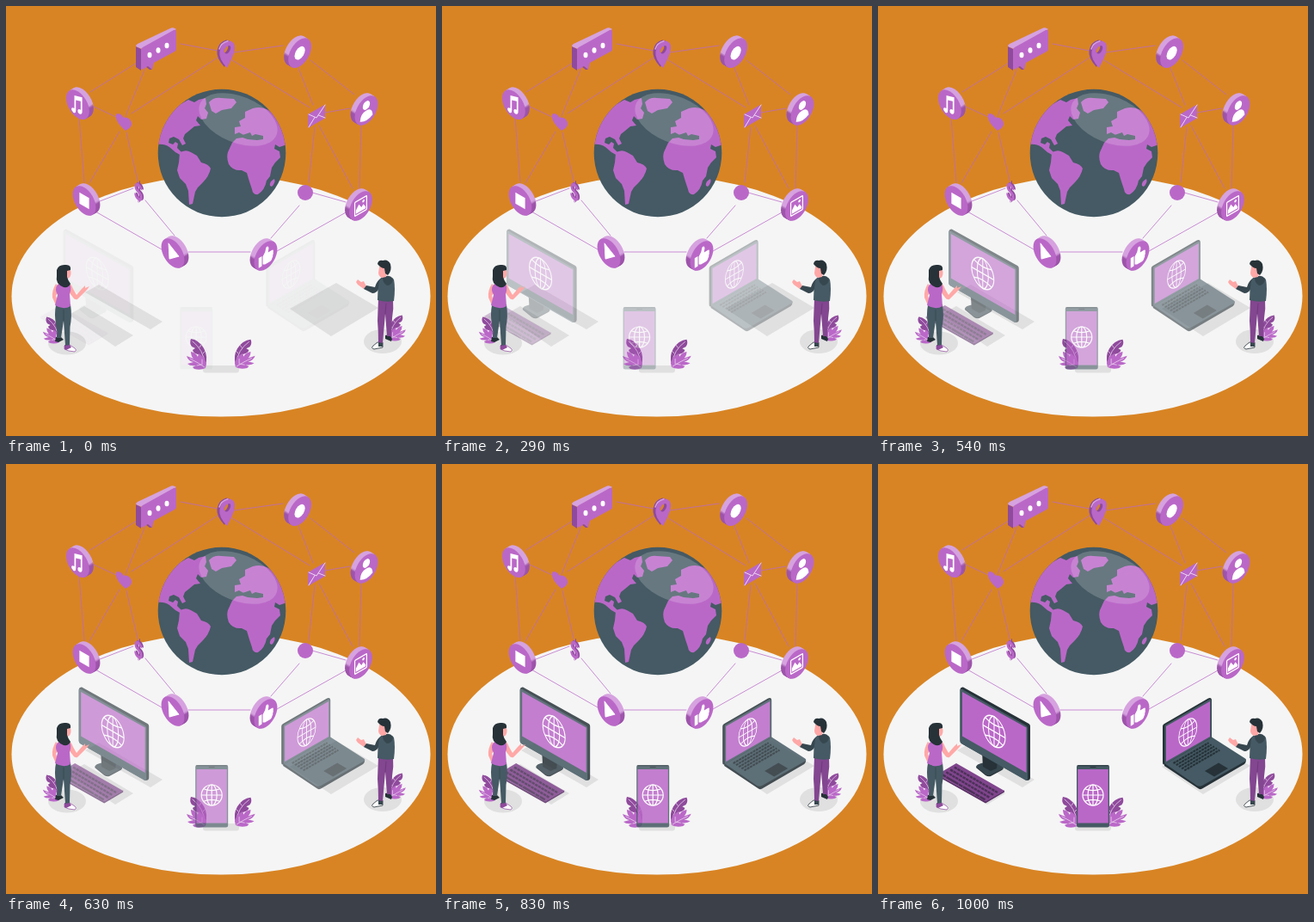
An HTML page for the animation above (1.04 s loop, 500x500 px).

```html
<!DOCTYPE html>
<html lang="en">
<head>
<meta charset="utf-8">
<title>Connected world</title>
<style>
  html, body { margin: 0; width: 100%; height: 100%; overflow: hidden; background: #d88424; }
  svg { display: block; width: 100vw; height: 100vh; }
</style>
</head>
<body>
<svg id="stage" viewBox="0 0 500 500" xmlns="http://www.w3.org/2000/svg"></svg>
<script>
const LOOP = 1040, STEP = 1000 / 24, STEPS = 25, TRAVEL = 30;
const PURPLE = '#ba68c8', DEEP = '#8f4a9c', LIGHT = '#d6a2df', PALE = '#ead3ee';
const SLATE = '#455a64', DARK = '#263238', STEEL = '#37474f';
const SKIN = '#ffa8a7', SHADE = '#e0e0e0';

const path = (d, fill, extra = '') => `<path d="${d}" fill="${fill}" ${extra}/>`;
const poly = (pts, fill, extra = '') => `<polygon points="${pts}" fill="${fill}" ${extra}/>`;
const line = (d, stroke, w, extra = '') =>
  `<path d="${d}" fill="none" stroke="${stroke}" stroke-width="${w}" stroke-linecap="round" stroke-linejoin="round" ${extra}/>`;
const oval = (x, y, rx, ry, fill, extra = '') =>
  `<ellipse cx="${x}" cy="${y}" rx="${rx}" ry="${ry}" fill="${fill}" ${extra}/>`;
const group = (transform, body) => `<g transform="${transform}">${body}</g>`;

const defs = `<defs>
  <linearGradient id="rim" x1="0" y1="0" x2="0" y2="1">
    <stop offset=".34" stop-color="${LIGHT}"/><stop offset=".42" stop-color="#9d54aa"/>
  </linearGradient>
  <clipPath id="world"><circle cx="251" cy="171" r="74.3"/></clipPath>
</defs>`;

// Globe with continents
function earth() {
  const land = [
    // North America
    'M176 161L180 143L196 118L212 109L219 112L224 109L232 107L233 114L231 119L235 124L233 131L227 132L223 128L221 133L226 139L219 140L213 145L208 149L206 154L209 160L205 162L201 155L195 152L190 154L189 159L194 161L197 158L200 160L199 165L203 169L207 171L204 174L197 170L190 164Q184 160 176 161Z',
    // South America
    'M202 171Q208 166 215 170L222 174L227 182Q236 184 238 189Q236 198 229 205L223 211L220 216L217 230L213 231L212 215L209 207L202 200L199 191L201 182Z',
    // Greenland
    'M236 112Q241 106 250 107L265 108L268 112L262 119L251 121L244 125L239 122Z',
    // Europe, Asia and Africa
    'M266 149L266 141L273 140L271 134L278 130L278 123L287 119Q297 116 305 121L318 132L330 160L318 164L313 161L312 166L318 169L319 176L313 182L309 188L307 198L303 203Q301 214 293 219Q287 220 286 213L283 204L280 194L274 191Q264 192 259 184Q256 176 258 170L263 159L268 154L275 153L278 151L271 147Z',
    'M307 209Q306 204 312 201Q314 205 309 210Z'
  ];
  const sea = 'M275 150L284 147L286 151L290 149L299 151L299 155L292 156L281 155L275 153Z';
  return oval(251, 171, 74.3, 74.3, SLATE) + `<g clip-path="url(#world)">` +
    land.map(d => path(d, PURPLE)).join('') + path(sea, SLATE) +
    oval(270, 132, 48, 27, '#fff', 'opacity=".18" transform="rotate(22 270 132)"') + '</g>';
}

// Each link: x1 y1 x2 y2
const links = `98 100 152 66,162 72 139 128,203 44 246 52,246 60 146 125,265 54 322 46,263 63 353 118,
340 72 357 115,354 63 405 103,371 124 400 119,102 117 128 129,85 130 91 205,132 146 97 206,140 147 153 203,
109 227 148 212,104 239 181 283,162 226 196 267,212 286 284 286,308 270 341 232,315 285 397 239,
356 217 395 228,352 205 359 141,364 139 403 212,413 138 411 212`;
const network = () => line(links.split(',').map(s => {
  const [a, b, c, d] = s.trim().split(' ');
  return `M${a} ${b}L${c} ${d}`;
}).join(''), PURPLE, .75);

// Isometric coin; side 1 has its rim on the right, -1 on the left
function coin(x, y, side, icon) {
  const iso = (dx, dy, body) => group(`matrix(.866 ${.5 * side} 0 1 ${x + dx} ${y + dy})`, body);
  let out = '';
  for (let i = 5; i > 0; i--) out += iso(i * side, -.6 * i, '<circle r="15.5" fill="url(#rim)"/>');
  return out + iso(0, 0, `<circle r="15.5" fill="${PURPLE}"/>` + icon);
}

const icons = {
  music: path('M-4.5 -8.5L6 -11.5L6 5Q6 9 2.5 9.5Q-.5 9.5 0 6.5Q1 4 4 4L4 -6L-2.5 -4L-2.5 8Q-2.5 12 -6 12Q-9 11.5 -8.4 8.6Q-7.4 6.2 -4.5 6.6Z', '#fff'),
  person: '<circle cy="-6" r="4.8" fill="#fff"/>' + path('M-8.5 9Q-8 0 0 0T8.5 9Q0 14 -8.5 9Z', '#fff'),
  play: path('M-5.8 -8.6L8 -.5L-4.6 8.8Z', '#fff', 'stroke="#fff" stroke-linejoin="round"'),
  thumb: path('M-9.5 -2H-5.2V9.5H-9.5ZM-4 -1Q0 -4 .5 -9.5Q3.5 -11 4 -7L3.2 -2.5H8.5Q11 -2 10 1Q10.8 2.5 9.5 4Q10 6 8.5 7Q8.5 9.5 6 9.5H-1L-4 8Z', '#fff'),
  photo: '<rect x="-8" y="-8" width="16" height="16" rx="1" fill="none" stroke="#fff" stroke-width="1.4"/>' +
    path('M-6.5 6V2L-2.5 -3L1 2L3.5 -.5L6.5 4V6Z', '#fff') + '<circle cx="3.6" cy="-4" r="1.5" fill="#fff"/>',
  disc: '<circle r="7" fill="#fff"/>',
  square: '<rect x="-6.5" y="-6.5" width="13" height="13" fill="#fff"/>'
};

function chat() {
  return poly('151,47 157,50 157,75 151,71', DEEP) +
    path('M151 47Q151 45 153 44L192 25.5Q195 24.5 198 27L158 50Z', LIGHT) +
    path('M157 51Q157 49 159 48L195 28Q198 27 198 30V50Q198 52 196 53L172 66L170 74L165 70L159 73.5Q157 74.5 157 72Z', PURPLE) +
    path('M165 70L170 74L167 74L163 71Z', DEEP) +
    [[167, 57], [177, 51.5], [187, 46]].map(([x, y]) => oval(x, y, 2.5, 3.3, '#fff')).join('');
}

function pin() {
  const body = 'M257 72Q247 61 248.5 53Q250 43 259 40.5Q267 41 266 50Q265 58 257 72ZM258 46.5Q253.5 49 254 54Q256 57 259 54Q262 50 261 47Q260 45.5 258 46.5Z';
  return path(body, DEEP, 'fill-rule="evenodd" transform="translate(-3 -1)"') +
    path(body, PURPLE, 'fill-rule="evenodd"') +
    line('M248 50Q250 43 258 40.8', LIGHT, 1.5);
}

function dollar() {
  const sign = (x, y, fill) => group(`matrix(.72 .4 0 1.15 ${x} ${y})`,
    `<text text-anchor="middle" font-family="Inter, sans-serif" font-weight="700" font-size="23" fill="${fill}">$</text>`);
  return sign(155.3, 225, DEEP) + sign(154, 225.7, PURPLE);
}

function smallIcons() {
  const heart = 'M139 145C133 140 127 133 128 127C129 123 135 126 137 130C141 128 147 133 146 138C145 142 142 143 139 145Z';
  return path(heart, PURPLE) +
    poly('351,126 371,114.5 371,130.5 351,142', PURPLE) +
    line('M352 126L361 130L371 115M352 141L359 129.5M371 130L363.5 127', '#f3e3f5', .9) +
    oval(348, 217, 9, 9, PURPLE);
}

// Wire globe, drawn round 0,0
const wire = (transform, r) => group(transform,
  `<g fill="none" stroke="#fff" stroke-width="1.2"><circle r="${r}"/><ellipse rx="${r * .5}" ry="${r}"/>` +
  `<path d="M0 ${-r}V${r}M${-r} 0H${r}M${-r * .8} ${-r * .6}Q0 ${-r * .3} ${r * .8} ${-r * .6}` +
  `M${-r * .8} ${r * .6}Q0 ${r * .3} ${r * .8} ${r * .6}"/></g>`);

function keyboard() {
  let keys = '';
  for (let i = 0; i < 4; i++) {
    const x = 74.5 + i * 4.8, y = 361 - i * 2.8;
    keys += line(`M${x} ${y}l50 29.4`, '#4b3158', 2.4, `stroke-dasharray="${i ? '3.4 .8' : '5 .8 16 .8'}" style="stroke-linecap:butt"`);
  }
  return poly('69,361 125,392 147,379.5 147,381.5 125,394.5 69,363', '#5a3066') +
    poly('69,361 91,348 147,380 125,392.5', '#80458d') + keys;
}

function monitor() {
  return path('M114 353Q115 350 120 349L133 346L145 352Q147 354 144 356L131 363Q128 364 125 362Z', DARK) +
    path('M114 352Q115 349 120 348L133 345L145 351Q147 353 144 355L131 361.5Q128 362.5 125 361Z', STEEL) +
    poly('121,335 139,345 138,354 131,357 122,352', DARK) +
    path('M95.5 262Q96 259 99 259.5L175.5 302Q177 303 177 305V365Q177 368 173 368L97 325Q95.5 324 95.5 322Z', DARK) +
    path('M95.5 263Q95.5 261 98 262L172 304Q174 305 174 307V366Q174 368.5 172 368L97 325Q95.5 324 95.5 322Z', SLATE) +
    poly('98,265 172.5,306.5 172.5,359 98,316.5', PURPLE) +
    wire('matrix(.866 .5 0 1.15 135 311)', 15);
}

function laptop() {
  let keys = '';
  for (let i = 0; i < 5; i++)
    keys += line(`M${343.5 + i * 3.2} ${348 + i * 2.1}l41 -23.8`, DARK, 2.1, 'stroke-dasharray="3 .8" style="stroke-linecap:butt"');
  return path('M333 348V351L372 377Q374 379 377 377.5L426 349Q428 347.5 428 344L388 320Z', DARK) +
    path('M333 348L388 317.5L427 342.5Q429 344 427 345.5L377 374Q374 375.5 371 374Z', SLATE) + keys +
    poly('380,357 396,347.5 407,354 391,363.5', DARK) +
    path('M331 305Q331 303 333 302L384 272.5Q388 271 388 275V318L333 349.5Q331 350 331 347Z', DARK) +
    path('M333.5 305Q333.5 303.5 335 303L385 274Q387.5 273 387.5 276V318L333.5 349Z', SLATE) +
    poly('335,305 386,276 386,317 335,346', PURPLE) +
    wire('matrix(.7 -.4 0 1 360.3 312)', 15);
}

function phone() {
  return `<rect x="231" y="350" width="38" height="72.5" rx="2.5" fill="${SLATE}"/>` +
    `<rect x="232.3" y="355" width="35.4" height="62.5" fill="${PURPLE}"/>` +
    line('M247 352.5H253', DARK, 1.2) + line('M232 350.8H268', DARK, .8) +
    wire('translate(250 385)', 12);
}

const shadows = () =>
  poly('108,324 182,367 168,376 92,333', SHADE) +
  poly('73,359 91,349 148,383 127,396', SHADE) +
  poly('330,352 384,322 433,351 378,384', SHADE) +
  `<rect x="229" y="418" width="42" height="8.5" rx="3" fill="${SHADE}"/>` +
  oval(71, 392, 22, 13.5, SHADE) + oval(438, 390, 22, 14, SHADE);

// Two-leaf plant, its root at 0,0 and leaning left
function plant(x, y, sx, sy) {
  const tall = 'M0 -3Q3 -14 -2 -23Q-8 -33 -17 -34Q-19 -29 -16 -25L-12 -23L-15 -21Q-14 -17 -9 -16L-6 -15L-9 -13Q-5 -9 0 -3Z';
  const low = 'M0 0Q-6 3 -13 1L-15 -1L-11 -3Q-18 -2 -21 -5L-14 -7Q-20 -8 -22 -14L-14 -11Q-17 -14 -17 -19Q-11 -18 -9 -13L-8 -17Q-1 -13 1 -5Z';
  return group(`translate(${x} ${y}) scale(${sx} ${sy})`,
    path(tall, DEEP) + line('M-1 -5Q-2 -21 -15 -31M-3 -17L0 -20M-7 -24L-5 -27', PALE, .8) +
    path(low, PURPLE) + line('M-1 -1Q-8 -6 -18 -11M-5 -4L-10 -3M-4 -4L-4 -10', PALE, .8));
}

function woman() {
  return path('M58 323Q53 331 54 339L58 348L61 346L58 337L63 328Z', SKIN) +
    path('M58 385L64 385L67 388L61 391L57 390Z', DARK) +
    path('M68 395L74 394L80 398Q83 400 80 402L73 401L68 399Z', '#fff', `stroke="${DEEP}" stroke-width=".7"`) +
    path('M68 394L74 394L76 397L70 400L68 399Z', DEEP) +
    path('M58 348L75 347Q77 361 74.5 373L74 394L69 395L67 366L64 386L59 386Q60 378 58 370Q56 358 58 348Z', SLATE) +
    line('M67 366L67 353', STEEL, .8) +
    path('M72 321Q76 323 78 329L82 336L88 329L92 325L92 328L97 326L94 330L83 341Q80 342 78 339L72 331Z', SKIN) +
    path('M60 324Q65 319 73 322Q77 327 74 335L75 349Q67 354 57 348L60 336Q56 329 60 324Z', PURPLE) +
    path('M68 305Q74 303 75.5 309Q76 316 71 317L72 323L66 322Z', SKIN) +
    path('M59 307Q61 300 70 301Q76 301 75 307L71 308L71 315Q72 319 75 323Q73 328 67 327Q57 323 59 314Z', DARK);
}

function man() {
  return path('M441 383L446 382L449 387L448 390L441 387Z', DARK) +
    path('M432 391L438 391L438 397L428 399Q424 398 427 395Z', '#fff', `stroke="${DARK}" stroke-width=".8"`) +
    path('M433 391L438 391L438 396L433 396Z', STEEL) +
    path('M433 340L450 340Q451 352 449 363L448 384L443 384L441 358L438 392L433 391Q433 378 432 366Z', '#834690') +
    line('M441 358L442 346', '#6a3875', .8) +
    path('M409 318L413 321L416 320L419 326L416 329L409 324L407 321Z', SKIN) +
    path('M437 316Q431 319 429 327L419 325L416 329L426 334Q431 334 434 328Z', STEEL) +
    path('M436 316Q446 312 451 318Q453 328 451 343Q442 345 432 342Q432 330 434 320Z', SLATE) +
    path('M438 316Q445 311 450 317Q449 325 443 325Q438 322 438 316Z', STEEL) +
    path('M434 304Q434 300 440 301L444 306L442 315L437 316Q433 314 433 310Z', SKIN) +
    path('M432 300Q433 295 438 296Q444 294 447 300Q449 308 444 313L441 311L440 305Q436 305 432 300Z', DARK);
}

const mover = body => `<g class="mover">${body}</g>`;

document.getElementById('stage').innerHTML = defs +
  '<rect width="500" height="500" fill="#d88424"/>' + oval(250, 337.3, 243.5, 140.3, '#f5f5f5') +
  shadows() + network() + earth() +
  chat() + pin() + smallIcons() + dollar() +
  coin(83.4, 114.7, 1, icons.music) + coin(91, 226.5, 1, icons.square) + coin(194, 287.5, 1, icons.play) +
  coin(341.6, 54.7, -1, icons.disc) + coin(419, 121.5, -1, icons.person) +
  coin(412.5, 232.5, -1, icons.photo) + coin(302, 290.5, -1, icons.thumb) +
  plant(232, 421, 1, 1) + plant(267, 420, -1.03, .95) +
  mover(monitor() + keyboard()) + mover(laptop()) + mover(phone()) +
  plant(62, 391, .87, .87) + plant(446, 388, -.86, .84) +
  woman() + man();

const movers = document.querySelectorAll('.mover');
const start = performance.now();

// Devices slide right and fade in at 24 steps a second
function draw() {
  const t = (performance.now() - start) % LOOP;
  const n = Math.min(STEPS - 1, Math.floor((t + 5) / STEP));
  const p = (n + 1) / STEPS;
  for (const el of movers) {
    el.setAttribute('transform', `translate(${-TRAVEL * (1 - p)} 0)`);
    el.setAttribute('opacity', p);
  }
  requestAnimationFrame(draw);
}
draw();
</script>
</body>
</html>
```
